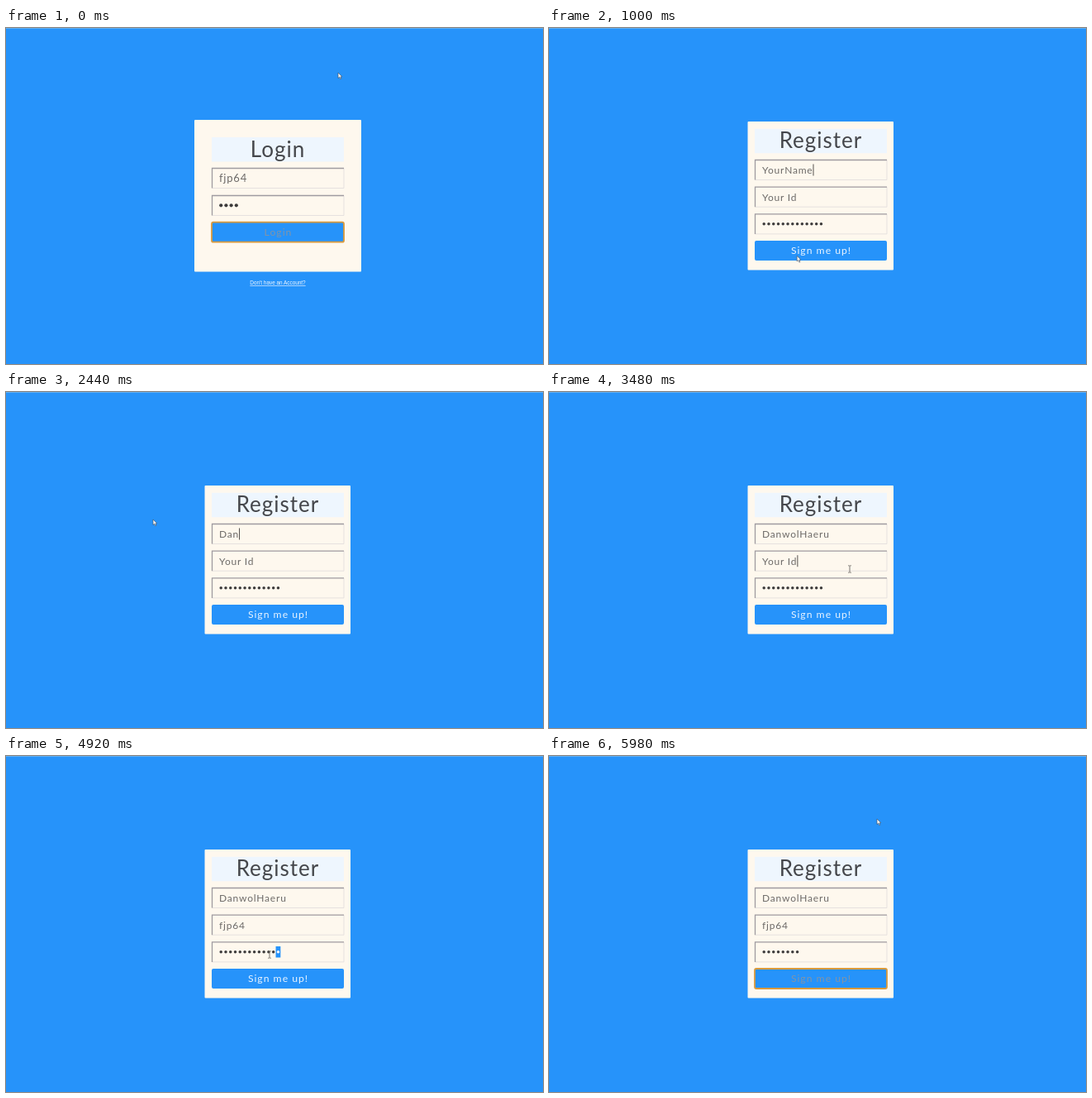
Animation of 650x406 px, one loop 6 s. Source, as an HTML page:

```html
<!DOCTYPE html>
<html lang="en">
<head>
<meta charset="utf-8">
<title>Login and register</title>
<style>
  html, body { margin: 0; width: 100%; height: 100%; overflow: hidden; background: #2693fa; }
  svg { display: block; width: 650px; height: 406px; user-select: none; }
  text { font-family: Lato, sans-serif; white-space: pre; }
  .title { font-size: 26px; letter-spacing: 1px; fill: #45474b; text-anchor: middle; }
  .value { font-size: 12px; letter-spacing: .8px; fill: #6d6a68; }
  .label { font-size: 12.2px; letter-spacing: 1px; fill: #eaf4ff; text-anchor: middle; }
  .link { font: 6.4px "Liberation Sans", sans-serif; fill: #f2f8ff; text-anchor: middle; text-decoration: underline; }
</style>
</head>
<body>
<svg id="stage" viewBox="0 0 650 406"></svg>
<script>
const LOOP = 6000, STEP = 20;
const BLUE = '#2693fa', CREAM = '#fef8ee';
const SWITCH = 860;
const stage = document.getElementById('stage');

function add(parent, tag, attrs, text) {
  const el = document.createElementNS('http://www.w3.org/2000/svg', tag);
  for (const k in attrs) el.setAttribute(k, attrs[k]);
  if (text) el.textContent = text;
  parent.appendChild(el);
  return el;
}
const set = (el, attrs) => { for (const k in attrs) el.setAttribute(k, attrs[k]); };
const show = (el, on) => el.setAttribute('visibility', on ? 'inherit' : 'hidden');

function card(x, y, width, height, titleY, title) {
  const g = add(stage, 'g', {});
  add(g, 'rect', { x, y, width, height, rx: 1, fill: CREAM });
  add(g, 'rect', { x: 249, y: titleY, width: 160, height: 29.5, fill: '#eef6fe' });
  add(g, 'text', { x: 329, y: titleY + 23.5, class: 'title' }, title);
  return g;
}

function field(g, y, text) {
  add(g, 'path', { d: `M409 ${y + .5}V${y + 24.5}H249.5`, fill: 'none', stroke: '#e6e1df' });
  add(g, 'path', { d: `M249.5 ${y + 24.5}V${y + .5}H409`, fill: 'none', stroke: '#9f9ba0', 'stroke-width': 1.3 });
  return add(g, 'text', { x: 258, y: y + 16.8, class: 'value' }, text);
}

function dots(g, n, y, gap, r) {
  return Array.from({ length: n }, (_, i) =>
    add(g, 'circle', { cx: 260.2 + gap * i, cy: y, r, fill: '#3d3b3b' }));
}

function button(g, y, text) {
  const box = add(g, 'rect', { x: 249, y, width: 160, height: 24, rx: 2, fill: BLUE });
  const label = add(g, 'text', { x: 329.5, y: y + 16.3, class: 'label' }, text);
  return focused => {
    set(box, { stroke: focused ? '#d99a3c' : 'none', 'stroke-width': 1.8 });
    label.style.fill = focused ? '#8294a8' : '#eaf4ff';
  };
}

add(stage, 'rect', { width: 650, height: 406, fill: BLUE });
add(stage, 'rect', { width: 650, height: 1, fill: '#62aef0' });

const login = card(228, 111, 202, 183.5, 132, 'Login');
field(login, 169, 'fjp64').style.fontSize = '13px';
field(login, 202, '');
dots(login, 4, 214.3, 6.2, 2.1);
const loginButton = button(login, 234.7, 'Login');
add(login, 'text', { x: 329, y: 310, class: 'link' }, 'Don\'t have an Account?');

const register = card(240.5, 113, 176.5, 179.5, 121.8, 'Register');
const nameText = field(register, 159, '');
const idText = field(register, 191.7, '');
field(register, 224.4, '');
const marked = add(register, 'rect', { y: 230, height: 13.5, fill: BLUE });
const GAP = 5.77;
const secret = dots(register, 13, 236.8, GAP, 1.75);
const registerButton = button(register, 257, 'Sign me up!');
const caret = add(register, 'rect', { width: 1, height: 14, fill: '#55524f' });

const arrow = add(stage, 'path', {
  d: 'M0 0V6.6L1.6 5.3 2.8 7.8 3.9 7.2 2.8 4.9 4.8 4.7Z',
  fill: '#f4f4f4', stroke: '#3c4c60', 'stroke-width': .6
});
const beam = add(stage, 'path', {
  d: 'M-1.8 -4.2H-.5L0 -3.7 .5 -4.2H1.8M0 -3.7V3.7M-1.8 4.2H-.5L0 3.7 .5 4.2H1.8',
  fill: 'none', stroke: '#6b6864', 'stroke-width': .9
});

// Pointer path: time, x, y
const path = [
  [-20, 397, 76], [0, 402, 54], [80, 405, 43], [200, 403, 50], [620, 344, 295],
  [720, 336, 306], [860, 336, 306], [900, 337, 312], [1220, 178, 154],
  [3240, 178, 154], [3460, 364, 214], [4380, 364, 214], [4560, 416, 230],
  [4640, 416, 254], [4720, 386, 250], [4860, 331, 241], [4920, 319, 240],
  [5060, 221, 242], [5140, 221, 242], [5320, 310, 248], [5360, 310, 248],
  [5500, 330, 268], [5660, 330, 268], [5960, 387, 90], [5980, 397, 76], [6000, 402, 54]
];

const slope = (i, k) => (path[i + 1][k] - path[i][k]) / (path[i + 1][0] - path[i][0]);

// Monotone tangent: no overshoot at stops and turns
function tangent(i, k) {
  if (i === 0) return slope(0, k);
  if (i === path.length - 1) return slope(i - 1, k);
  const a = slope(i - 1, k), b = slope(i, k);
  return a * b > 0 ? 2 * a * b / (a + b) : 0;
}

function pointer(t, k) {
  let i = 0;
  while (i < path.length - 2 && path[i + 1][0] <= t) i++;
  const p = path[i], q = path[i + 1], h = q[0] - p[0], u = (t - p[0]) / h, v = 1 - u;
  return p[k] * (1 + 2 * u) * v * v + q[k] * u * u * (3 - 2 * u)
    + h * u * v * (tangent(i, k) * v - tangent(i + 1, k) * u);
}

const every = (start, gap, n) => Array.from({ length: n }, (_, i) => start + gap * i);
const count = (times, t) => times.filter(s => s <= t).length;

// Erase the old text key by key, then type the new one
function typed(t, before, erase, after, keys) {
  const n = count(keys, t);
  return n ? after.slice(0, n) : before.slice(0, before.length - count(erase, t));
}

const nameErase = every(2080, 20, 8);
const nameKeys = [2320, 2380, 2440, 2580, 2640, 2740, 2900, 2940, 2980, 3040, 3080];
const idErase = every(3520, 40, 7);
const idKeys = every(4100, 50, 5);
const secretKeys = every(5100, 25, 8);
const DRAG = 4880, CLEAR = 5080, SUBMIT = 5560;

function draw(t) {
  const x = pointer(t, 1), y = pointer(t, 2), second = t >= SWITCH;
  show(login, !second);
  show(register, second);
  loginButton(t < 400);
  registerButton(t >= SUBMIT);

  nameText.textContent = typed(t, 'YourName', nameErase, 'DanwolHaeru', nameKeys);
  idText.textContent = typed(t, 'Your Id', idErase, 'fjp64', idKeys);

  const n = t < CLEAR ? 13 : count(secretKeys, t);
  const dragging = t >= DRAG && t < CLEAR;
  let first = 13;
  if (dragging) while (first > 0 && 260.2 + GAP * (first - 1) > x + 8) first--;
  secret.forEach((dot, i) => {
    show(dot, i < n);
    dot.setAttribute('fill', i >= first ? '#f4f8ff' : '#3d3b3b');
  });
  set(marked, { x: 257.3 + GAP * first, width: GAP * (13 - first) });

  let at = null;
  if (t < 3420) at = [258 + nameText.getComputedTextLength(), 164.5];
  else if (t < 4700) at = [258 + idText.getComputedTextLength(), 197.2];
  else if (t >= CLEAR && t < SUBMIT) at = [257.8 + GAP * n, 230];
  show(caret, second && at);
  if (at) set(caret, { x: at[0], y: at[1] });

  const inField = x > 249 && x < 409 && [159, 191.7, 224.4].some(f => y > f && y < f + 25);
  const text = second && (inField || dragging);
  show(arrow, !text);
  show(beam, text);
  set(text ? beam : arrow, { transform: `translate(${x.toFixed(2)} ${y.toFixed(2)})` });
}

const begin = performance.now();
function frame() {
  const t = (performance.now() - begin) % LOOP;
  draw(Math.floor(t / STEP) * STEP);
  requestAnimationFrame(frame);
}
frame();
</script>
</body>
</html>
```
